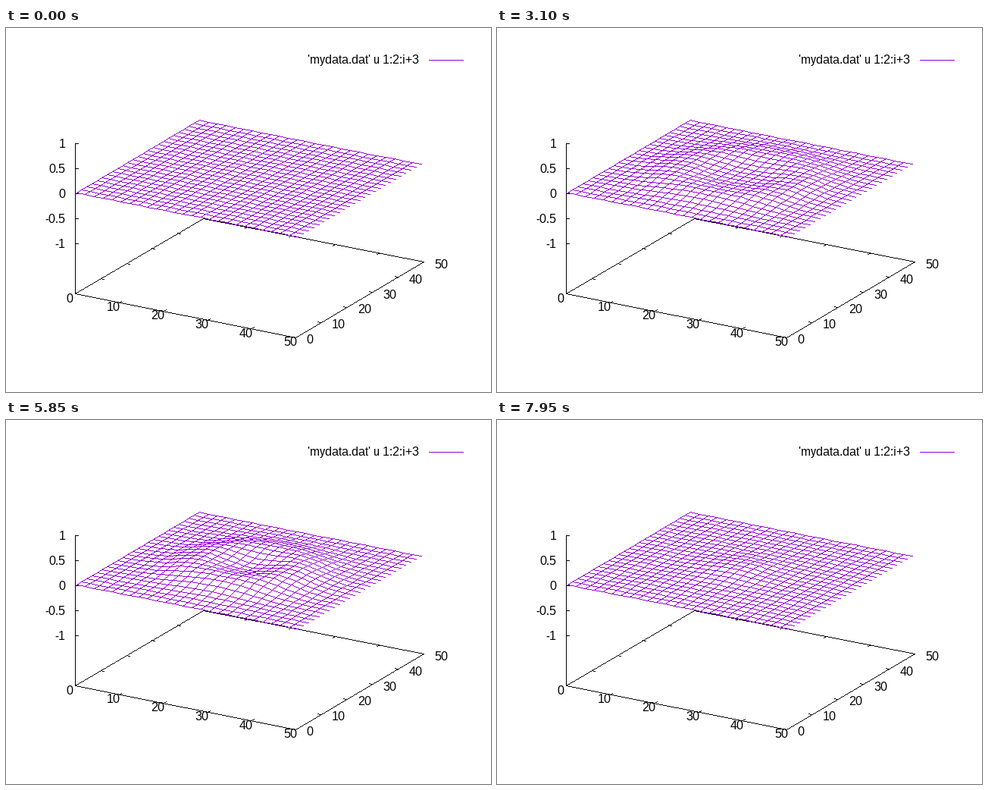
Animation of 640x480 px, one loop 8 s. Source, as a matplotlib script:

```python
import numpy as np
import matplotlib.pyplot as plt
from matplotlib.animation import FuncAnimation

W, H = 640, 480
FRAMES, STEP_MS = 160, 50
PEAK = 104                      # the motion runs backwards after this frame
BLACK, PURPLE = (0, 0, 0), (148, 0, 211)

ORIGIN = np.array([91, 218.0])
X_UNIT = np.array([5.81, 1.15])
Y_UNIT = np.array([3.38, -1.99])
Z_UNIT = np.array([0, -66.0])

plt.rcParams["text.hinting_factor"] = 1
plt.rcParams["text.hinting"] = "native"

fig = plt.figure(figsize=(W / 100, H / 100), dpi=100, facecolor="white")
ax = fig.add_axes([0, 0, 1, 1])
ax.axis("off")


def project(x, y, z):
    x, y, z = (np.asarray(v, float)[..., None] for v in (x, y, z))
    return ORIGIN + x * X_UNIT + y * Y_UNIT + z * Z_UNIT


def stroke(canvas, starts, ends, color):
    """Draw hard one-pixel lines, one dot per step of the longer side."""
    a = np.floor(np.reshape(starts, (-1, 2)) + 0.5)
    d = np.floor(np.reshape(ends, (-1, 2)) + 0.5) - a
    n = np.maximum(np.abs(d).max(axis=1), 1)
    t = np.minimum(np.arange(n.max() + 1) / n[:, None], 1)
    dots = np.floor(a[:, None] + t[..., None] * d[:, None] + 0.5).astype(int)
    canvas[dots[..., 1], dots[..., 0]] = color


def line(canvas, points, color=BLACK):
    points = np.asarray(points, float)
    stroke(canvas, points[:-1], points[1:], color)


def tick(canvas, x, y, dx, dy):
    line(canvas, project([x, x + dx], [y, y + dy], [-2, -2]))


def label(x, y, text, ha="center"):
    ax.text(x, y + 6, text, ha=ha, va="baseline", size=11.52,
            family="Liberation Sans", color="black")


def draw_axes(canvas):
    line(canvas, project([0, 50, 50, 0, 0], [0, 0, 50, 50, 0], [-2] * 5))
    line(canvas, project([0, 0], [0, 0], [-2, 1]))

    for z in (1, 0.5, 0, -0.5, -1):
        px, py = project(0, 0, z)
        line(canvas, [(px, py), (px + 4, py)])
        label(78.5, py, f"{z:g}", "right")

    for v in range(0, 51, 10):
        if 0 < v < 50:
            tick(canvas, v, 0, 0, 1)
            tick(canvas, v, 50, 0, -1)
            tick(canvas, 0, v, 0.7, 0)
            tick(canvas, 50, v, -0.7, 0)
        label(84 + 5.82 * v, 355.5 + 1.15 * v, str(v))
        shift = 0 if v else -5
        label(405.5 + 3.37 * v + shift, 410 - 1.98 * v, str(v))

    label(545, 41.5, "'mydata.dat' u 1:2:i+3", "right")
    line(canvas, [(558, 42), (603, 42)], PURPLE)


# The rows run one cell past the last cross line.
gx, gy = np.meshgrid(2.016 * np.arange(26), 0.5 + 2 * np.arange(25))
dome = np.sin(np.pi * gx / 50.4) * np.sin(np.pi * gy / 49)
rim = np.maximum(dome, 0) ** 0.6
dist = np.hypot(gx - 25.2, gy - 24.5)


def height(i):
    f = i - PEAK
    swell = np.sin(np.pi * i / (2 * PEAK))
    radius = 24 * np.sin(0.055 * f) ** 2
    strength = 0.17 * np.exp(-(f / 55) ** 4)
    ring = np.exp(-((dist - radius) / 6.5) ** 2)
    return strength * rim * ring + 0.05 * swell * dome


base = np.full((H, W, 3), 255, np.uint8)
draw_axes(base)
picture = ax.imshow(base, extent=(0, W, H, 0), interpolation="nearest",
                    aspect="auto")


def update(i):
    p = project(gx, gy, height(i))
    canvas = base.copy()
    stroke(canvas, p[:, :-1], p[:, 1:], PURPLE)
    stroke(canvas, p[:-1, :-1], p[1:, :-1], PURPLE)
    picture.set_data(canvas)
    return (picture,)


anim = FuncAnimation(fig, update, frames=FRAMES, interval=STEP_MS,
                     repeat=True, repeat_delay=0)
plt.show()
```
